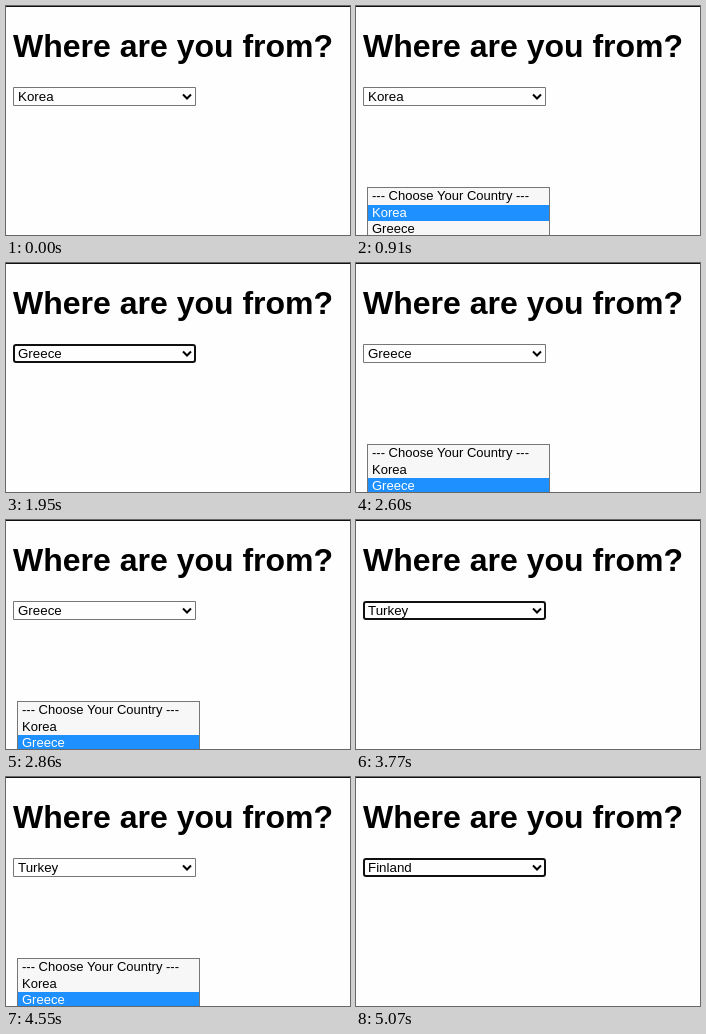
An HTML page with a canvas that plays this animation: 344 px wide and 229 px high, repeating every 6370 ms.

```html
<!DOCTYPE html>
<html lang="en">
<head>
<meta charset="utf-8">
<title>Where are you from?</title>
<style>
  html, body { margin: 0; width: 100%; height: 100%; overflow: hidden; background: #fff; }
  canvas { display: block; width: 344px; height: 229px; }
</style>
</head>
<body>
<canvas id="stage" width="344" height="229"></canvas>
<script>
const canvas = document.getElementById('stage');
const ctx = canvas.getContext('2d');
const LOOP = 6370;
const FONT = '"Liberation Sans", Arial, sans-serif';
const OPTIONS = ['--- Choose Your Country ---', 'Korea', 'Greece'];

// Each step: start time, selected value, view ('idle', 'focus' or 'open'), highlighted row
const STEPS = [
  [0, 'Korea', 'idle'],
  [650, 'Korea', 'focus'],
  [910, 'Korea', 'open', 1],
  [1300, 'Korea', 'open', 2],
  [1950, 'Greece', 'focus'],
  [2600, 'Greece', 'open', 2],
  [2730, 'Greece', 'open', 1],
  [2860, 'Greece', 'open', 2],
  [3380, 'Greece', 'open', -1],
  [3770, 'Turkey', 'focus'],
  [4290, 'Turkey', 'open', -1],
  [4420, 'Turkey', 'open', 1],
  [4550, 'Turkey', 'open', 2],
  [4680, 'Turkey', 'open', -1],
  [5070, 'Finland', 'focus']
];

function rect(x, y, w, h, color) {
  ctx.fillStyle = color;
  ctx.fillRect(x, y, w, h);
}

function text(str, x, y, font, color = '#000') {
  ctx.font = `${font} ${FONT}`;
  ctx.fillStyle = color;
  ctx.fillText(str, x, y);
}

function drawSelect(value, focused) {
  ctx.beginPath();
  if (focused) {
    ctx.roundRect(8, 82, 181, 17, 2);
    ctx.lineWidth = 2;
    ctx.strokeStyle = '#101010';
  } else {
    ctx.rect(7.5, 81.5, 182, 18);
    ctx.lineWidth = 1;
    ctx.strokeStyle = '#767676';
  }
  ctx.stroke();
  text(value, 12, 95, '13.333px');

  ctx.beginPath();
  ctx.moveTo(177, 88.5);
  ctx.lineTo(181, 92.5);
  ctx.lineTo(185, 88.5);
  ctx.lineWidth = 2;
  ctx.strokeStyle = '#000';
  ctx.stroke();
}

function drawList(active) {
  rect(11, 181, 183, 60, '#767676');
  rect(12, 182, 181, 60, '#f7f7f7');
  OPTIONS.forEach((label, i) => {
    const on = i === active;
    if (on) rect(12, 183 + i * 16, 181, 16, '#1e90ff');
    text(label, 16, Math.round(194 + i * 16.5), '13px', on ? '#fff' : '#000');
  });
}

function draw(time) {
  const [, value, view, active] = STEPS.findLast(step => step[0] <= time);
  rect(0, 0, 344, 229, '#fefefe');
  rect(0, 0, 344, 1, '#111');
  text('Where are you from?', 7, 51, 'bold 32px');
  drawSelect(value, view === 'focus');
  if (view === 'open') drawList(active);
}

function tick() {
  draw(performance.now() % LOOP);
  requestAnimationFrame(tick);
}
tick();
</script>
</body>
</html>
```
